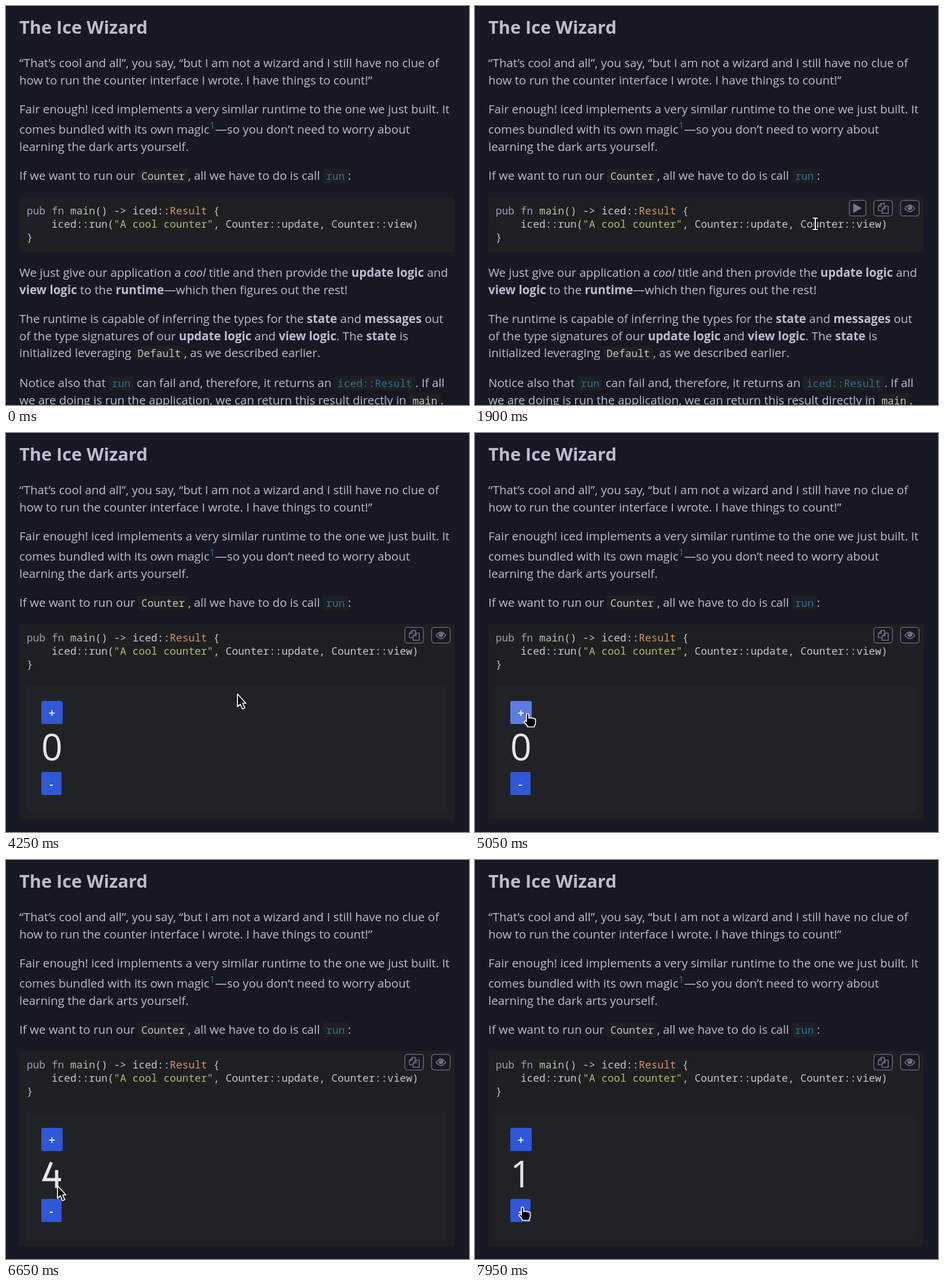
Recreate the animation shown at these times as an HTML page. Size 800x691 px, loop 8000 ms.

```html
<!DOCTYPE html>
<html lang="en">
<head>
<meta charset="utf-8">
<title>The Ice Wizard</title>
<style>
html, body { margin: 0; width: 100%; height: 100%; overflow: hidden; background: #161923; }
.stage {
  position: relative; width: 800px; height: 691px; overflow: hidden;
  color: #bcbdd0; font: 20.48px/30px "Open Sans", sans-serif;
}
.stage * { animation-duration: 8s; animation-iteration-count: infinite; animation-timing-function: step-end; }
.stage > *, .block > *, .app > * { position: absolute; }
p, h2, pre { margin: 0; white-space: pre; }
p { position: absolute; left: 23px; top: var(--y); }
h2 { left: 23px; top: 14px; font-size: 30.72px; line-height: 44px; }
code, pre { font: 500 17.92px/23.3px "Noto Sans Mono", "DejaVu Sans Mono", monospace; color: #c5c8c6; }
code { line-height: 0; padding: 0 .3em .08em; border-radius: 3px; background: #1d1f21; }
.link { color: #2f6f9a; }
sup { font-size: .833em; line-height: 0; }

/* code block */
.block { left: 23px; top: 330.5px; width: 752px; height: 95px; background: #1d1f21; animation-name: grow; }
.block pre { left: 12.8px; top: 12px; }
.kw { color: #a898b6; } .fn { color: #b3c4b0; } .ty { color: #d29468; } .str { color: #b5b96e; }
@keyframes grow { 0% { height: 95px; } 41.75%, 100% { height: 338.5px; } }
.more { left: 0; top: 0; animation-name: push; }
@keyframes push { 0% { transform: none; } 41.75%, 100% { transform: translateY(243.5px); } }

/* toolbar */
.tools { left: 0; top: 0; animation-name: fade; animation-timing-function: linear; }
@keyframes fade { 0%, 18% { opacity: 0; } 19.25%, 100% { opacity: 1; } }
.tools rect { fill: #161923; stroke: #737480; stroke-width: 1.3; }
.tools path { fill: none; stroke: #737480; stroke-width: 1.6; stroke-linejoin: round; }
.tools circle { fill: #737480; }
.tools .glint { stroke: #161923; stroke-width: 1; }
.tools .play { animation-name: gone; }
.tools .play rect { animation-name: lit; }
.tools .play path { fill: #737480; stroke: none; animation-name: blue; }
@keyframes gone { 0% { visibility: visible; } 41.75%, 100% { visibility: hidden; } }
@keyframes lit { 34.4%, 100% { fill: #282e40; stroke: #b7b9cc; } }
@keyframes blue { 34.4%, 100% { fill: #2b79a2; } }

/* counter app */
.panel { left: 13px; top: 107px; width: 726px; height: 219px; background: #202225; animation-name: open; }
@keyframes open { 0% { visibility: hidden; } 41.75%, 100% { visibility: visible; } }
.app { left: 0; top: 0; animation-name: ready; }
@keyframes ready { 0% { visibility: hidden; } 45.5%, 100% { visibility: visible; } }
.btn {
  left: 61px; height: 40px; border-radius: 2.5px; background: #3057d6;
  color: #fff; font-weight: 600; line-height: 40px; text-align: center;
}
.plus { top: 463.5px; width: 36.5px; animation-name: plus; }
.minus { top: 586.8px; width: 34.5px; animation-name: minus; }
@keyframes plus {
  0%, 68%, 71.125%, 74.25%, 77.375%, 81%, 100% { background: #3057d6; }
  61.6%, 69.25%, 72.375%, 75.5%, 78.625% { background: #5e7ce2; }
}
@keyframes minus {
  0%, 89.875%, 93%, 96.125%, 99.25%, 100% { background: #3057d6; }
  85%, 91.125%, 94.25%, 97.375% { background: #5e7ce2; }
}
.count { left: 61px; top: 503px; width: 60px; height: 80px; overflow: hidden; }
.strip { font-size: 64px; line-height: 80px; color: #e6e6e6; animation-name: count; }
.strip > * { display: block; height: 80px; }
.strip path { fill: none; stroke: #e6e6e6; stroke-width: 5.6; }
@keyframes count {
  0% { transform: none; }
  69.25% { transform: translateY(-80px); }
  72.375% { transform: translateY(-160px); }
  75.5% { transform: translateY(-240px); }
  78.625% { transform: translateY(-320px); }
  91.125% { transform: translateY(-240px); }
  94.25% { transform: translateY(-160px); }
  97.375%, 100% { transform: translateY(-80px); }
}

/* pointer */
.stage > .pointer {
  left: 0; top: 0; width: 1px; height: 1px; overflow: visible;
  animation-name: move; animation-timing-function: ease-in-out;
}
.pointer path { fill: #000; stroke: #fff; stroke-width: 1.7; stroke-linejoin: round; }
@keyframes move {
  0%, 10.5% { transform: translate(610px, 715px); animation-timing-function: ease-in; }
  16% { transform: translate(600px, 440px); animation-timing-function: ease-out; }
  22%, 30% { transform: translate(588px, 377px); }
  36%, 42.5% { transform: translate(655px, 359px); }
  53.125% { transform: translate(400px, 452px); }
  62.5%, 65% { transform: translate(91px, 486px); }
  66.5%, 80.2% { transform: translate(93px, 487px); animation-timing-function: ease-in; }
  81.7% { transform: translate(95px, 525px); animation-timing-function: ease-out; }
  83.125% { transform: translate(89px, 564px); }
  86.5%, 100% { transform: translate(82px, 601px); }
}
.pointer .beam { fill: #fff; stroke: #000; stroke-width: 2.4; paint-order: stroke; animation-name: beam; }
.hand { animation-name: hand; }
.arrow { animation-name: arrow; }
@keyframes beam {
  0%, 42.6% { visibility: visible; }
  34.4%, 49.1%, 100% { visibility: hidden; }
}
@keyframes hand {
  0%, 42.6%, 81% { visibility: hidden; }
  34.4%, 61.6%, 85%, 100% { visibility: visible; }
}
@keyframes arrow {
  0%, 61.6%, 85%, 100% { visibility: hidden; }
  49.1%, 81% { visibility: visible; }
}
</style>
</head>
<body>
<div class="stage">
  <h2>The Ice Wizard</h2>
  <p style="--y:83px">“That’s cool and all”, you say, “but I am not a wizard and I still have no clue of</p>
  <p style="--y:113px">how to run the counter interface I wrote. I have things to count!”</p>
  <p style="--y:163px">Fair enough! iced implements a very similar runtime to the one we just built. It</p>
  <p style="--y:198px">comes bundled with its own magic<sup class="link">1</sup>—so you don’t need to worry about</p>
  <p style="--y:228px">learning the dark arts yourself.</p>
  <p style="--y:278px">If we want to run our <code>Counter</code>, all we have to do is call <code class="link">run</code>:</p>

  <div class="more">
    <p style="--y:446px">We just give our application a <i>cool</i> title and then provide the <b>update logic</b> and</p>
    <p style="--y:476px"><b>view logic</b> to the <b>runtime</b>—which then figures out the rest!</p>
    <p style="--y:526px">The runtime is capable of inferring the types for the <b>state</b> and <b>messages</b> out</p>
    <p style="--y:556px">of the type signatures of our <b>update logic</b> and <b>view logic</b>. The <b>state</b> is</p>
    <p style="--y:585px">initialized leveraging <code>Default</code>, as we described earlier.</p>
    <p style="--y:637px">Notice also that <code class="link">run</code> can fail and, therefore, it returns an <code class="link">iced::Result</code>. If all</p>
    <p style="--y:667px">we are doing is run the application, we can return this result directly in <code>main</code>.</p>
  </div>

  <div class="block">
    <pre><span class="kw">pub</span> <span class="kw">fn</span> <span class="fn">main</span>() -&gt; iced::<span class="ty">Result</span> {
    iced::run(<span class="str">"A cool counter"</span>, Counter::update, Counter::view)
}</pre>
    <div class="panel"></div>
  </div>

  <svg class="tools" width="800" height="691">
    <g class="play">
      <rect x="646.8" y="336.6" width="28.6" height="27" rx="4.5"/>
      <path d="M653.5 341.5L668.5 350 653.5 358.5z"/>
    </g>
    <rect x="689.2" y="336.6" width="32" height="27" rx="4.5"/>
    <path d="M702.5 354.5H697V347l5-5h5.5v4M702 342v5h-5M703.5 351.5l5-5h5.5v12.5h-10.5zM708.5 346.5v5h-5"/>
    <rect x="735.4" y="336.6" width="32" height="27" rx="4.5"/>
    <path d="M743 350.3q8.4-11.6 16.8 0-8.4 11.6-16.8 0z"/>
    <circle cx="751.4" cy="349.3" r="4.2"/>
    <path class="glint" d="M749 349.3q0-2.4 2.4-2.4"/>
  </svg>

  <div class="app">
    <div class="btn plus">+</div>
    <div class="count">
      <div class="strip">
        <span>0</span><span>1</span><span>2</span><span>3</span>
        <svg width="60" height="80" role="img" aria-label="4"><path d="M17.5 20.5L5 50.5H34M26.5 34V65"/></svg>
      </div>
    </div>
    <div class="btn minus">-</div>
  </div>

  <svg class="pointer">
    <path class="beam" d="M-4.5-10.5H4.5V-8.5H1V9H4.5V11H-4.5V9H-1V-8.5H-4.5z"/>
    <path class="hand" d="M-2 2a2 2 0 0 1 4 0v6q2-1.5 4 0 2-1 4 .5 2.5-.5 3.5 1.5v6q0 3-2 6v1H0q-1-4-6-8 0-3 3-2l1 1z"/>
    <path class="arrow" d="M0 0V22L5 17.5 8.5 26 12.5 24.3 9 16H14.5z"/>
  </svg>
</div>
</body>
</html>
```
